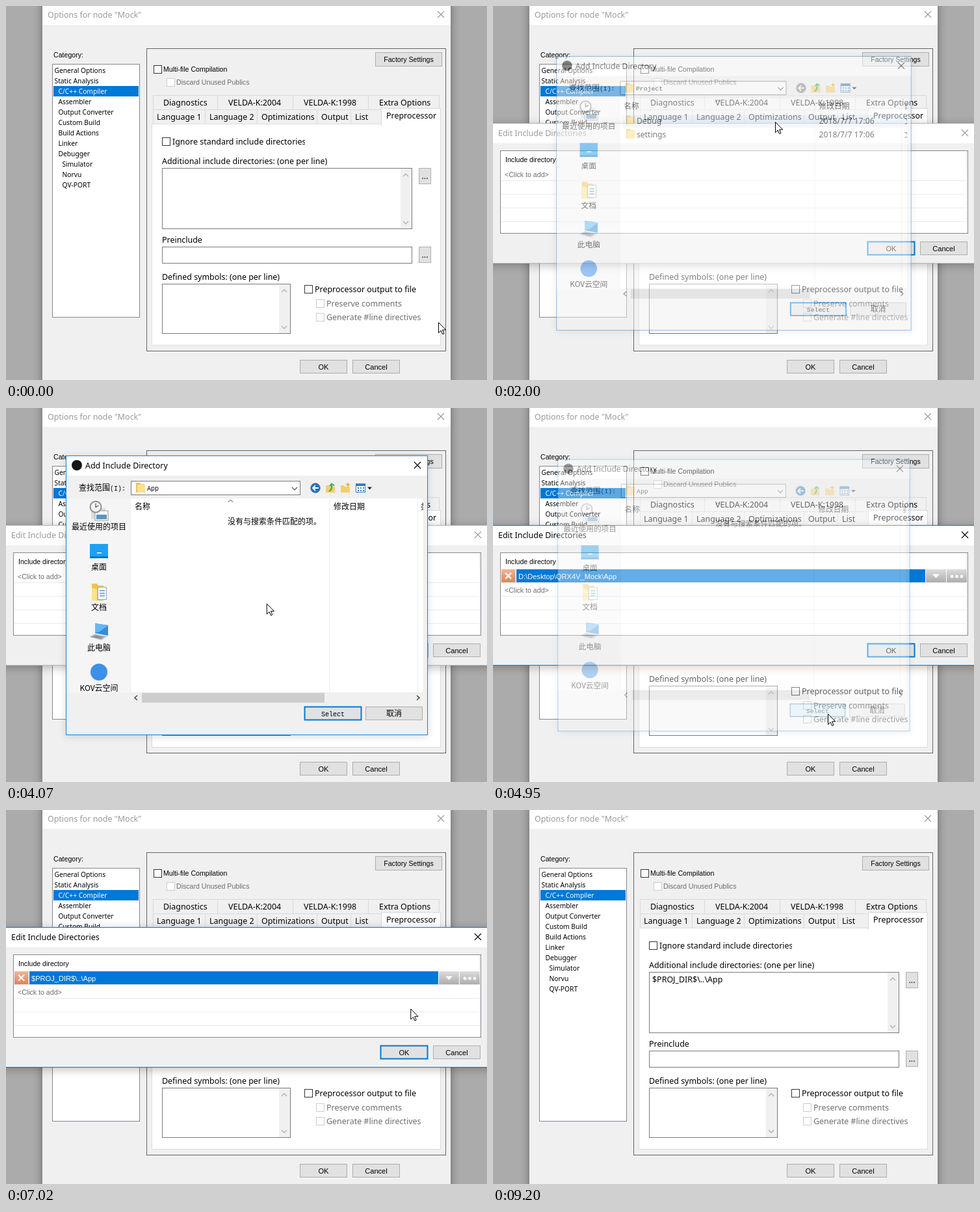
An HTML page for the animation above (9440 ms loop, 740x575 px).

```html
<!DOCTYPE html>
<html lang="en">
<head>
<meta charset="utf-8">
<title>Include directories</title>
<style>
html, body { margin: 0; width: 100%; height: 100%; overflow: hidden; background: #ababab; }
svg { display: block; width: 100%; height: 100%; }
text { white-space: pre; fill: #000; }
.u { font: 12.45px "Noto Sans", "Noto Sans CJK SC", sans-serif; }
.l { font: 10.25px "Noto Sans", sans-serif; }
.s { font: 10.6px "Liberation Sans", sans-serif; }
.e { font: 11.1px "Liberation Sans", sans-serif; }
.c { font: 12px "Noto Sans CJK SC", "Noto Sans CJK", sans-serif; }
.m { font: 10px "Liberation Mono", monospace; }
#main { filter: drop-shadow(0 0 7px rgba(0,0,0,.4)); }
#edit { filter: drop-shadow(0 3px 7px rgba(0,0,0,.26)); }
#file { filter: drop-shadow(0 2px 6px rgba(0,0,0,.15)); }
#menu { filter: drop-shadow(3px 3px 2px rgba(0,0,0,.35)); }
</style>
</head>
<body>
<svg id="stage" viewBox="0 0 740 575" preserveAspectRatio="none">
  <defs>
    <clipPath id="cutLabel"><rect x="240" y="195" width="220" height="24"/></clipPath>
    <clipPath id="cutList"><rect x="192" y="112" width="450" height="325"/></clipPath>
    <linearGradient id="grayBtn" x2="0" y2="1"><stop stop-color="#dcdcdc"/><stop offset="1" stop-color="#adadad"/></linearGradient>
    <linearGradient id="blueBtn" x2="0" y2="1"><stop stop-color="#c5e2f6"/><stop offset="1" stop-color="#86bfe8"/></linearGradient>
    <linearGradient id="redBtn" x2="0" y2="1"><stop stop-color="#efb599"/><stop offset="1" stop-color="#de8459"/></linearGradient>
  </defs>
</svg>
<script>
const LOOP = 9440;
const BLUE = '#0078d7', DIM = '#6d6d6d', PALE = '#999';
const PROJECT = 'QRX4V_Mock';
const ABS_PATH = `D:\\Desktop\\${PROJECT}\\App`;
const REL_PATH = '$PROJ_DIR$\\..\\App';
const CLICK_TO_ADD = '&lt;Click to add&gt;';

// markup helpers
const rect = (x, y, w, h, fill, extra = '') =>
  `<rect x="${x}" y="${y}" width="${w}" height="${h}" fill="${fill}" ${extra}/>`;
const box = (x, y, w, h, fill, stroke, extra = '') =>
  rect(x + .5, y + .5, w - 1, h - 1, fill, `stroke="${stroke}" ${extra}`);
const path = (d, stroke, width = 1, extra = '') =>
  `<path d="${d}" fill="none" stroke="${stroke}" stroke-width="${width}" ${extra}/>`;
const shape = (d, fill, extra = '') => `<path d="${d}" fill="${fill}" ${extra}/>`;
const text = (x, y, str, cls = 'u', fill = '#000', extra = '') =>
  `<text x="${x}" y="${y}" class="${cls}" style="fill:${fill}" ${extra}>${str}</text>`;
const mid = (x, y, str, cls, fill, extra = '') => text(x, y, str, cls, fill, `text-anchor="middle" ${extra}`);
const group = (id, body, extra = '') => `<g id="${id}" ${extra}>${body}</g>`;
const hidden = 'display="none"';
const button = (x, y, w, h, label, cls = 's', id = '') =>
  box(x, y, w, h, '#e1e1e1', '#adadad', id && `id="${id}"`) + mid(x + w / 2, y + h / 2 + 4, label, cls);
const check = (x, y, label, cls = 'u', off = false, extra = '') =>
  box(x, y, 13, 13, '#fff', off ? '#ccc' : '#333') +
  text(x + (cls === 's' ? 15 : 16), y + (cls === 's' ? 10 : 11), label, cls, off ? DIM : '#000', extra);
const cross = (x, y, r, stroke, extra = '') =>
  path(`M${x - r} ${y - r}L${x + r} ${y + r}M${x + r} ${y - r}L${x - r} ${y + r}`, stroke, 1.1, extra);
const chevron = (x, y, dx, dy, stroke, w = 1.5) => dx
  ? path(`M${x - dx} ${y - 3.5}l${dx * 2} 3.5l${-dx * 2} 3.5`, stroke, w)
  : path(`M${x - 4} ${y - dy}l4 ${dy * 2}l4 ${-dy * 2}`, stroke, w);
const folder = (x, y) =>
  shape(`M${x} ${y}h6l1 2h6v13h-13z`, '#eec257') + shape(`M${x + 2} ${y + 3}h12v12h-12z`, '#ffe08c');

function area(x, y, w, h) {
  const sx = x + w - 18, cx = sx + 8;
  return box(x, y, w, h, '#fff', '#7a7a7a') + rect(sx, y + 1, 17, h - 2, '#f0f0f0') +
    chevron(cx, y + 11, 0, -2, '#b4b4b4') + chevron(cx, y + h - 10, 0, 2, '#b4b4b4');
}

function tabs(y, h, edges, labels, starts) {
  return labels.map((s, i) =>
    box(edges[i], y, edges[i + 1] - edges[i] + 1, h, '#f0f0f0', '#d9d9d9') +
    text(starts[i], y + 16, s)).join('');
}

function mainWindow() {
  const items = [[0, 'General Options'], [0, 'Static Analysis'], [1, 'C/C++ Compiler'], [1, 'Assembler'],
    [1, 'Output Converter'], [1, 'Custom Build'], [1, 'Build Actions'], [1, 'Linker'], [1, 'Debugger'],
    [2, 'Simulator'], [2, 'Norvu'], [2, 'QV-PORT']];
  return rect(56, -10, 628, 600, '#f0f0f0') + rect(56, -10, 628, 39, '#fff') +
    text(64, 18, 'Options for node "Mock"', 'u', PALE) + cross(669, 13, 5, PALE) +
    text(73, 79, 'Category:', 's') + box(71, 89, 135, 390, '#fff', '#828790') +
    rect(73, 123, 131, 16, BLUE) +
    items.map(([d, s], i) => text(74.5 + d * 6, 103 + i * 16, s, 'l', i === 2 ? '#fff' : '#000')).join('') +
    box(216, 65, 461, 466, 'none', '#646464') +
    button(568, 71, 103, 22, 'Factory Settings') +
    check(227, 91, 'Multi-file Compilation', 's') + check(247, 111, 'Discard Unused Publics', 's', true) +
    tabs(137, 23, [226, 325, 441, 557, 666], ['Diagnostics', 'VELDA-K:2004', 'VELDA-K:1998', 'Extra Options'],
      [242, 342, 458, 574]) +
    tabs(159, 23, [226, 306, 386, 478, 530, 577], ['Language 1', 'Language 2', 'Optimizations', 'Output', 'List'],
      [232, 313, 393, 485, 537]) +
    box(224, 181, 445, 341, '#fff', '#dcdcdc') + box(577, 157, 92, 27, '#fff', '#d9d9d9') +
    rect(578, 180, 90, 5, '#fff') + text(585, 173, 'Preprocessor') +
    check(240, 202, 'Ignore standard include directories', 'u', false, 'clip-path="url(#cutLabel)"') +
    text(240, 243, 'Additional include directories: (one per line)') + area(240, 249, 385, 94) +
    text(245, 265, REL_PATH, 'u', '#000', 'id="saved"') +
    button(635, 249, 19, 25, '...', 'u', 'browse') +
    text(240, 364, 'Preinclude') + box(240, 370, 385, 26, '#fff', '#7a7a7a') + button(635, 370, 19, 25, '...', 'u') +
    text(240, 421, 'Defined symbols: (one per line)') + area(240, 427, 198, 77) +
    check(459, 429, 'Preprocessor output to file') + check(477, 451, 'Preserve comments', 'u', true) +
    check(477, 472, 'Generate #line directives', 'u', true) +
    button(452, 544, 73, 21, 'OK', 'e') + button(533, 544, 73, 21, 'Cancel', 'e');
}

function editWindow() {
  return rect(-20, 181, 780, 214, '#f0f0f0') + rect(-20, 181, 780, 30, '#fff') +
    path('M-20 180.5H760M-20 395.5H760', BLUE, 1, 'id="editEdge"') +
    text(8, 200, 'Edit Include Directories', 'u', '#000', 'id="editTitle"') +
    cross(726, 195, 5, '#000', 'id="editClose"') +
    box(11, 222, 720, 128, '#fff', '#828790') + text(19, 240, 'Include directory', 's') +
    path('M728.5 224V247', '#e0e0e0') +
    [268, 289, 310, 331].map(y => path(`M13 ${y + .5}H729`, '#ebebf0')).join('') +
    text(18, 263, REL_PATH, 'e', '#000', 'id="entry"') +
    text(18, 263, CLICK_TO_ADD, 's', DIM, 'id="adder"') +
    button(576, 362, 73, 21, 'OK', 'e', 'editOk') + button(657, 362, 73, 21, 'Cancel', 'e') +
    group('row', entryEditor(), hidden);
}

function entryEditor() {
  return rect(13, 248, 21.5, 20, 'url(#redBtn)') +
    path('M19 253.5l9 9m0 -9l-9 9', '#fff', 2.2) +
    rect(36, 248, 629, 20, BLUE) + text(39, 263, '', 'e', '#fff', 'id="value"') +
    rect(666, 248, 31, 20, 'url(#grayBtn)', 'id="drop"') + shape('M676 255.5h11l-5.5 6z', '#fff') +
    rect(698, 248, 31, 20, 'url(#grayBtn)') +
    [706, 713.5, 721].map(x => `<circle cx="${x}" cy="259" r="2.4" fill="#fff"/>`).join('');
}

const listing = (id, name, rows) => group(id,
  text(217, 127, name, 'm') + folder(200, 115) +
  rows.map(([s, date], i) => folder(202, 166 + i * 21) + text(218, 179 + i * 21, s) +
    text(504, 179 + i * 21, date) + text(638, 179 + i * 21, '文件夹', 'c')).join(''));

function sideIcons() {
  const recent = rect(131, 154, 22, 17, '#d9dde0') + rect(137, 158, 20, 15, '#f7f7f7', 'stroke="#9aa0a5"') +
    rect(139, 164, 16, 7, '#5c96bd') + '<circle cx="138" cy="152" r="8.5" fill="#f4f4f4" stroke="#8c9196" stroke-width="2"/>' +
    path('M138 146.5V152.5L142.5 150', '#555', 1.2);
  const desktop = rect(129, 209, 28, 22, '#1ea1f2') + rect(129, 228, 28, 3, '#0b74c4') + rect(140, 222, 7, 1.5, '#fff');
  const docs = shape('M132 270h8l2 3h8v23h-18z', '#eec257') + box(141, 275, 14, 20, '#fff', '#9aa7b2') +
    [280, 284, 288].map(y => rect(144, y, 8, 1.6, '#5b9bd5')).join('') + shape('M132 276l8 3v18l-8-2z', '#ffe08c');
  const pc = shape('M137 331l20 3v16l-20 -4z', '#2f8fdb') + shape('M137 331l20 3l-13 10l-7 1z', '#66b7f0') +
    shape('M128 352l9 -5l19 4l-9 6z', '#bfc5ca') + shape('M131 352l7 -3l13 3l-6 3z', '#8d959b');
  return recent + desktop + docs + pc + '<circle cx="143" cy="406" r="13" fill="#3d8fe8"/>';
}

function fileWindow() {
  const day = '2018/7/7 ';
  const places = ['最近使用的项目', '桌面', '文档', '此电脑', 'KOV云空间'];
  return box(92, 73, 557, 430, '#f0f0f0', '#1883d7') + rect(93, 74, 555, 30, '#fff') +
    '<circle cx="109" cy="88" r="8" fill="#151515"/>' + text(122, 93, 'Add Include Directory') +
    cross(633, 88, 5, '#000') +
    text(112, 127, '查找范围', 'c') + text(160, 127, '(I):', 'm') +
    box(192, 112, 261, 22, '#fff', '#7a7a7a') + chevron(444, 124, 0, 2, '#555', 1.2) +
    '<circle id="back" cx="476" cy="123" r="7.5" stroke="#777" stroke-opacity=".5"/>' +
    path('M481 123H472M476 119l-4 4l4 4', '#fff', 1.8) +
    box(488, 112, 23, 22, '#cce8ff', '#99d1ff', 'id="upHover"') +
    shape('M492 119h5l1 2h8v9h-14z', '#f3cf6b') + path('M497 128q5 -2 4 -9M498 120l3 -3.5l4 3', '#35a13c', 2) +
    shape('M515 119h5l1 2h8v9h-14z', '#f3cf6b') + shape('M526 114l1 3l3 1l-3 1l-1 3l-1 -3l-3 -1l3 -1z', '#f0a020') +
    box(538, 116, 15, 14, '#fff', '#3b7cb8') + rect(538, 116, 15, 4, '#3b7cb8') +
    [541, 545, 549].map(x => rect(x, 122, 2, 2, '#3b7cb8') + rect(x, 126, 2, 2, '#3b7cb8')).join('') +
    shape('M556 121.5h7l-3.5 4z', '#222') +
    rect(93, 139, 97, 299, '#f5f5f5') + sideIcons() +
    places.map((s, i) => mid(143, 187 + i * 62, s, 'c')).join('') +
    rect(192, 139, 450, 298, '#fff') + rect(196, 165, 446, 20, '#e5f3ff', 'id="rowHover"') +
    rect(196, 248, 446, 21, '#d9d9d9', 'id="rowPicked"') +
    path('M497.5 140V437M633.5 140V437', '#ececec') + path('M341.5 144.5l4 -3l4 3', '#555') +
    text(198, 156, '名称', 'c') + text(504, 156, '修改日期', 'c') +
    group('lists',
      text(638, 156, '类型', 'c') +
      listing('project', 'Project', [['Debug', day + '17:06'], ['settings', day + '17:06']]) +
      listing('root', PROJECT, [['App', day + '15:05'], ['Bsp', day + '15:05'], ['Doc', day + '15:06'],
        ['Libraries', day + '15:04'], ['Project', day + '17:06']]) +
      listing('app', 'App', []), 'clip-path="url(#cutList)"') +
    mid(413, 179, '没有与搜索条件匹配的项。', 'c', '#000', 'id="empty"') +
    rect(192, 437, 450, 17, '#f0f0f0') + rect(209, 438, 281, 15, '#cdcdcd') +
    chevron(200, 445.5, -2, 0, '#444') + chevron(634, 445.5, 2, 0, '#444') +
    button(459, 459, 88, 21, 'Select', 'm', 'select') + button(553, 459, 88, 21, '取消', 'c');
}

function dropMenu() {
  return box(667, 269, 240, 50, '#f2f2f2', '#c4c4c4') +
    rect(669, 293, 240, 22, '#91c9f7', 'id="menuHover"') +
    text(701, 286, ABS_PATH) + text(701, 308, REL_PATH);
}

const stage = document.getElementById('stage');
stage.insertAdjacentHTML('beforeend',
  group('main', mainWindow()) + group('edit', editWindow()) + group('file', fileWindow()) +
  group('menu', dropMenu(), hidden) +
  group('cursor', shape('M.5 .5V16.5L4.2 13L6.7 18.6L9 17.6L6.6 12H11.7Z', '#fff', 'stroke="#000"')));

const el = {};
stage.querySelectorAll('[id]').forEach(n => { el[n.id] = n; });
const set = (id, attrs) => { for (const k in attrs) el[id].setAttribute(k, attrs[k]); };
const show = (id, on) => set(id, { display: on ? 'inline' : 'none' });
const clamp = v => Math.min(1, Math.max(0, v));

// cursor stops: time, x, y
const STOPS = [[50, 665, 486], [900, 643, 262], [1250, 643, 262], [1680, 430, 258], [1890, 430, 258],
  [2000, 434, 178], [2100, 434, 178], [2700, 497, 121], [2940, 497, 121], [3080, 315, 173], [3700, 315, 173],
  [4520, 515, 470], [4950, 515, 470], [5580, 685, 257], [5900, 685, 258], [6050, 685, 258], [6580, 712, 300],
  [6840, 712, 300], [7340, 411, 318], [7520, 411, 318], [8020, 602, 373], [8340, 602, 373], [9140, 640, 590]];

function cursorAt(t) {
  const i = STOPS.findIndex(s => s[0] > t);
  if (i === 0) return STOPS[0].slice(1);
  if (i < 0) return STOPS[STOPS.length - 1].slice(1);
  const [t0, x0, y0] = STOPS[i - 1], [t1, x1, y1] = STOPS[i];
  const p = (t - t0) / (t1 - t0), k = p * p * (3 - 2 * p);
  return [x0 + (x1 - x0) * k, y0 + (y1 - y0) * k];
}

// window opens growing and fades away shrinking
function windowPose(id, t, open, close) {
  const p = clamp((t - open) / 140), q = clamp((t - close) / 140);
  const scale = .922 + .078 * (1 - (1 - p) ** 2) - .044 * q;
  show(id, p > 0 && q < 1);
  set(id, { opacity: p * (1 - q), transform: `translate(370.5 288) scale(${scale}) translate(-370.5 -288)` });
}

function paintButton(id, over, isDefault) {
  set(id, { fill: over ? '#cce4f7' : '#e1e1e1', stroke: over ? '#005499' : isDefault ? BLUE : '#adadad',
    'stroke-width': isDefault && !over ? 2 : 1 });
}

function draw(t) {
  const [x, y] = cursorAt(t);
  const over = (l, top, w, h) => x >= l && x < l + w && y >= top && y < top + h;
  const fileOpen = 1930, fileClose = 4866, editClose = 8340;
  set('cursor', { transform: `translate(${x} ${y})` });

  windowPose('edit', t, 1060, editClose);
  windowPose('file', t, fileOpen, fileClose);
  show('saved', t >= editClose);
  paintButton('browse', t < 1060 && over(635, 249, 19, 25), false);

  const active = t < fileOpen || t >= fileClose;
  set('editEdge', { stroke: active ? BLUE : '#b5b5b5' });
  set('editClose', { stroke: active ? '#000' : PALE });
  el.editTitle.style.fill = active ? '#000' : PALE;
  show('entry', t >= 8160);
  set('adder', { y: t < fileClose ? 263 : 284 });
  paintButton('editOk', t > 7500 && over(576, 362, 73, 21), true);

  const view = t < 2940 ? 'project' : t < 3690 ? 'root' : 'app';
  for (const id of ['project', 'root', 'app']) show(id, id === view);
  show('empty', view === 'app');
  const count = { project: 2, root: 5, app: 0 }[view];
  const line = Math.floor((y - 165) / 21);
  show('rowHover', line >= 0 && line < count && x > 196 && x < 642);
  set('rowHover', { y: 165 + line * 21, fill: t > 3400 ? '#cce8ff' : '#e5f3ff' });
  show('rowPicked', view === 'root' && t < 3400);
  show('upHover', over(488, 112, 23, 22) || (t > 2900 && t < 3120));
  set('back', { fill: view === 'project' ? '#8a8a8a' : '#2272b9' });
  paintButton('select', over(459, 459, 88, 21), true);

  show('row', t >= fileClose && t < 8160);
  el.value.textContent = t < 6840 ? ABS_PATH : REL_PATH;
  set('drop', { fill: over(666, 248, 31, 20) || (t > 5600 && t < 6840) ? 'url(#blueBtn)' : 'url(#grayBtn)' });
  const menu = clamp((t - 5850) / 140);
  show('menu', menu > 0 && t < 6840);
  set('menu', { opacity: menu });
  show('menuHover', y > 292);
}

function frame(now) {
  draw(now % LOOP);
  requestAnimationFrame(frame);
}
draw(0);
requestAnimationFrame(frame);
</script>
</body>
</html>
```
